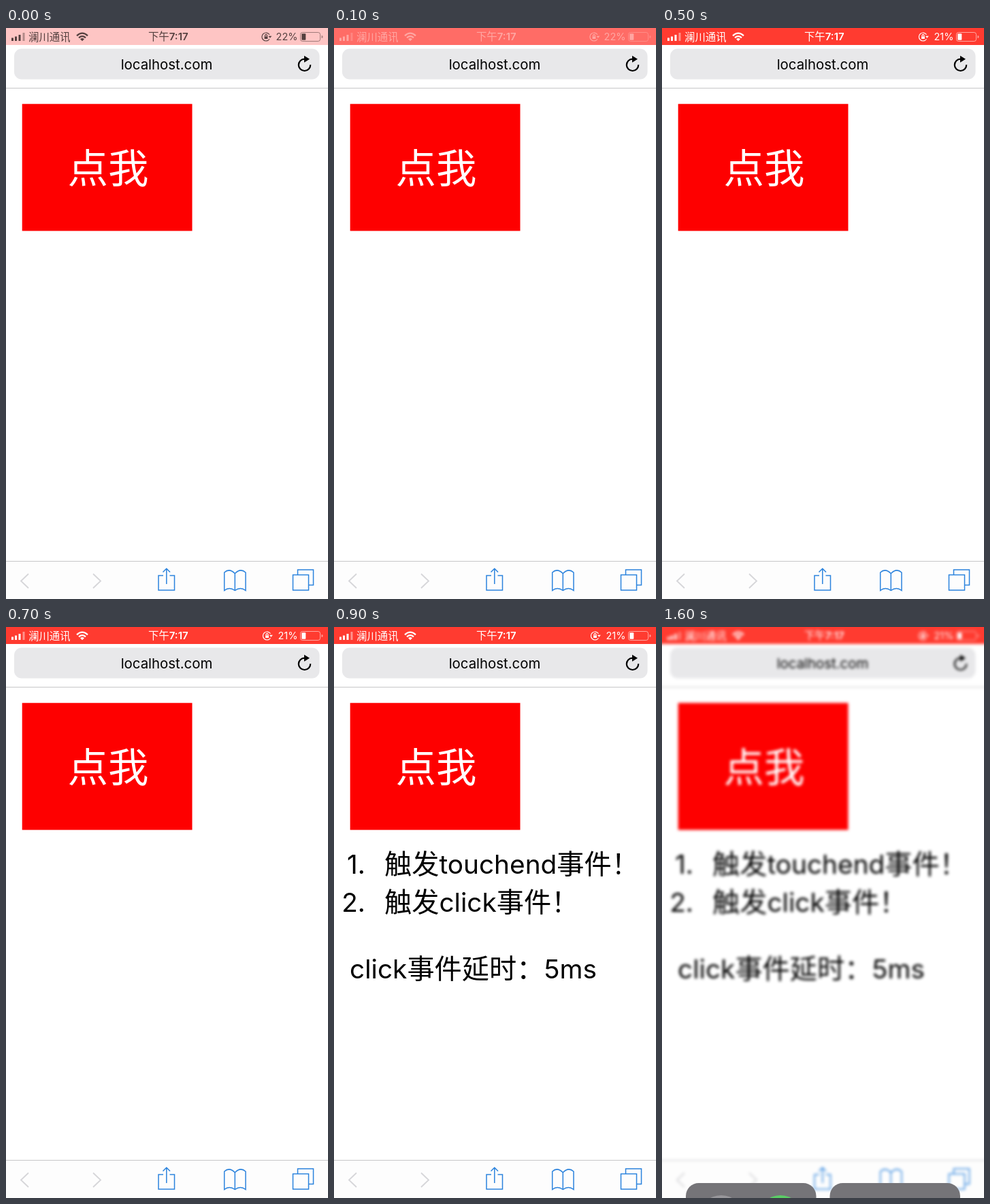
These frames come from a looping animation (473x840 px, 1700 ms). An HTML page:

```html
<!DOCTYPE html>
<html lang="zh-CN">
<head>
<meta charset="utf-8">
<style>
html, body { margin: 0; width: 100%; height: 100%; overflow: hidden; background: #fff; }
svg { display: block; width: 473px; height: 840px; }
text { font-family: Inter, "Noto Sans CJK SC", "Noto Sans CJK", sans-serif; white-space: pre; }
.zh { font-family: "Noto Sans CJK SC", "Noto Sans CJK", sans-serif; }
.line { fill: none; stroke: #2b83dd; stroke-width: 1.5; }
.list { font-size: 38.8px; }
.list .zh { font-size: 40.2px; }

.bar, .status, .early, .late, .result, .tap, .page, .panel { animation: 1700ms step-end infinite; }
.bar { animation-name: bar; }
.status { animation-name: status; }
.early { animation-name: early; }
.late { animation-name: late; }
.result { animation-name: result; }
.tap { animation-name: tap; }
.page { animation-name: blur; }
.panel { animation-name: panel; }

@keyframes bar { 0% { fill: #fec5c4; } 5.88% { fill: #ff6c66; } 11.76% { fill: #ff3b30; } }
@keyframes status { 0% { color: #54403f; } 5.88% { color: #ffa6a2; } 11.76% { color: #fff; } }
@keyframes early { 0% { visibility: visible; } 29.41%, 100% { visibility: hidden; } }
@keyframes late { 0% { visibility: hidden; } 29.41%, 100% { visibility: visible; } }
@keyframes result { 0% { visibility: hidden; } 47.05%, 100% { visibility: visible; } }
@keyframes tap { 0% { visibility: hidden; } 47.05% { visibility: visible; } 52.94%, 100% { visibility: hidden; } }
@keyframes blur { 0% { filter: none; } 94.11%, 100% { filter: blur(2.1px); } }
@keyframes panel { 0% { visibility: hidden; } 94.11%, 100% { visibility: visible; } }
</style>
</head>
<body>
<svg viewBox="0 0 473 840">
  <defs>
    <g id="lock" fill="none" stroke="currentColor" stroke-width="1.2">
      <path d="M5 -3.2A6 6 0 1 0 5 3.2"/>
      <path d="M3.4 -1.2H8.4L5.9 1.8Z" fill="currentColor" stroke="none"/>
      <path d="M-1.5 -.5V-1.8a1.5 1.5 0 0 1 3 0V-.5"/>
      <rect x="-2.4" y="-.6" width="4.8" height="3.6" fill="currentColor" stroke="none"/>
    </g>
  </defs>

  <g class="page">
    <rect x="-20" y="-20" width="513" height="880" fill="#fff"/>
    <rect class="bar" x="-20" y="-20" width="513" height="45"/>

    <g class="status" fill="currentColor">
      <path d="M8 14.5h3V19H8zM13 12.5h3V19h-3zM18.5 10h3v9h-3z"/>
      <path d="M24.5 7h3v12h-3z" opacity=".45"/>
      <text class="zh" x="33" y="18.6" font-size="15.4">澜川通讯</text>
      <g fill="none" stroke="currentColor" stroke-width="2.3">
        <path d="M104 11.3Q112 4 120 11.3"/>
        <path d="M107 14.3Q112 10 117 14.3"/>
      </g>
      <path d="M109 16.2Q112 13.8 115 16.2L112 19.2Z"/>
      <text x="238.3" y="18.3" font-size="15" font-weight="600" text-anchor="middle"><tspan class="zh" font-weight="500" font-size="15.4">下午</tspan>7:17</text>
      <g class="early">
        <use href="#lock" x="382" y="13"/>
        <text x="428.5" y="18.3" font-size="14.5" text-anchor="end">22%</text>
      </g>
      <g class="late">
        <use href="#lock" x="383.5" y="13"/>
        <text x="428.5" y="18.3" font-size="14.5" text-anchor="end">21%</text>
      </g>
      <rect x="432.5" y="6.5" width="29" height="13" rx="3" fill="none" stroke="currentColor" opacity=".55"/>
      <path d="M463.5 11a2 2 0 0 1 0 4z" opacity=".55"/>
      <rect x="434.3" y="8.3" width="6" height="9.4" rx="1"/>
    </g>

    <rect x="12" y="30.5" width="448.5" height="45" rx="11" fill="#e8e8ea"/>
    <text x="236" y="61" font-size="20.4" text-anchor="middle">localhost.com</text>
    <path d="M438.5 45.6A8.7 8.7 0 1 0 447.2 54" fill="none" stroke="#000" stroke-width="2.2"/>
    <path d="M438 40.8L446 45.8L438 50.8Z"/>
    <path d="M-20 88.5H493" stroke="#c6c6c8"/>

    <rect x="23.7" y="111.7" width="249.8" height="186.8" fill="#fe0000"/>
    <text class="zh" x="150" y="228" font-size="59.5" text-anchor="middle" fill="#fff">点我</text>
    <rect class="tap" x="20" y="108" width="257.5" height="194.5" rx="3" fill="#1e1e1e" opacity=".2"/>

    <g class="result list">
      <text x="46" y="363" text-anchor="end">1.</text>
      <text x="74" y="363"><tspan class="zh">触发</tspan>touchend<tspan class="zh">事件！</tspan></text>
      <text x="46" y="419" text-anchor="end">2.</text>
      <text x="74" y="419"><tspan class="zh">触发</tspan>click<tspan class="zh">事件！</tspan></text>
      <text x="23" y="517">click<tspan class="zh">事件延时：</tspan>5ms</text>
    </g>

    <rect x="-20" y="784" width="513" height="76" fill="#fdfdfd"/>
    <path d="M-20 784.5H493" stroke="#c6c6c8"/>
    <g class="line">
      <path d="M33 803L22 813.5L33 824M128 803L139 813.5L128 824" stroke="#d6d6d9" stroke-width="1.8"/>
      <path d="M231 805.5H224V827H247.5V805.5H240.5M235.8 818V795.5M230.5 800.5L235.8 795.2L241 800.5"/>
      <path d="M336.3 802.5Q328 794 320.7 801V827.5Q328 821.5 336.3 827.5Q344.5 821.5 352 827.5V801Q344.5 794 336.3 802.5V827.5"/>
      <path d="M421.5 804.5H444.5V827H421.5ZM428.5 804V797H451.5V819.5H445"/>
    </g>
  </g>

  <g class="panel">
    <g fill="#757478">
      <rect x="35" y="818" width="191.5" height="60" rx="19"/>
      <rect x="246.5" y="818" width="191.5" height="60" rx="19"/>
    </g>
    <circle cx="87" cy="870" r="34" fill="#98979b"/>
    <circle cx="174" cy="870" r="34" fill="#5bcd66"/>
  </g>
</svg>
</body>
</html>
```
